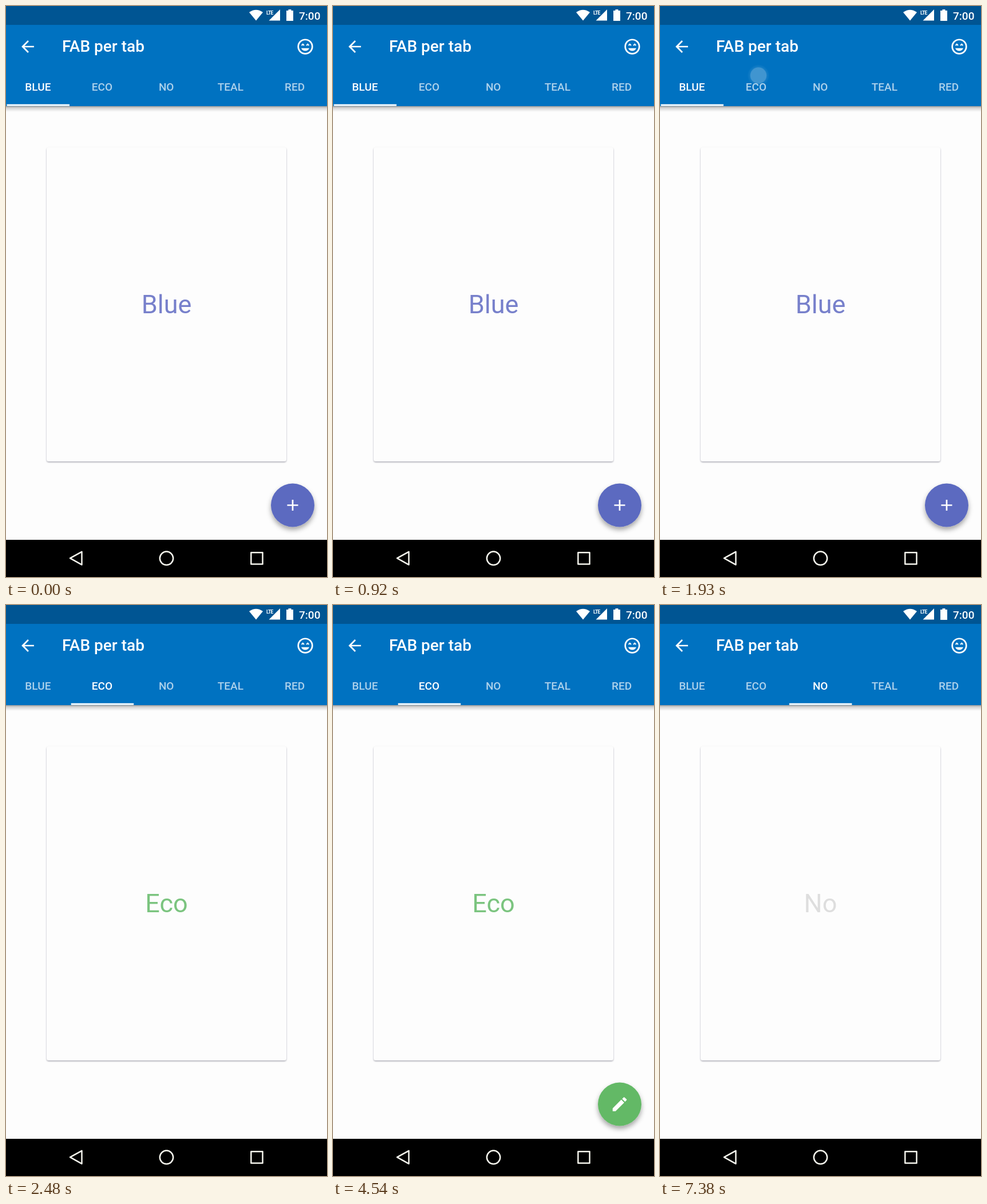
Recreate the animation shown at these times as an HTML page. Size 561 px wide and 998 px high, loop 8 s.

```html
<!DOCTYPE html>
<html lang="en">
<head>
<meta charset="utf-8">
<title>FAB per tab</title>
<style>
  html, body { margin: 0; width: 100%; height: 100%; overflow: hidden; background: #fdfdfd; }
  svg { display: block; width: 100%; height: 100%; font-family: Roboto, sans-serif; }
  .medium { font-weight: 500; fill: #fff; }
  .tab { font-size: 19px; text-anchor: middle; }
  .nav { fill: none; stroke: #f4f4ec; stroke-width: 2.5; stroke-linejoin: round; }
</style>
</head>
<body>
<svg viewBox="0 0 561 998">
  <defs>
    <linearGradient id="barShadow" x2="0" y2="1">
      <stop offset="0" stop-opacity=".4"/>
      <stop offset=".3" stop-opacity=".17"/>
      <stop offset="1" stop-opacity="0"/>
    </linearGradient>
    <radialGradient id="halo">
      <stop offset=".65" stop-color="#fff" stop-opacity=".3"/>
      <stop offset="1" stop-color="#fff" stop-opacity="0"/>
    </radialGradient>
    <filter id="cardShadow" x="-5%" y="-5%" width="110%" height="110%">
      <feDropShadow dx="0" dy="1.4" stdDeviation="1" flood-color="#33334d" flood-opacity=".45"/>
    </filter>
    <filter id="fabShadow" x="-30%" y="-30%" width="160%" height="170%">
      <feDropShadow dx="0" dy="5" stdDeviation="4" flood-opacity=".35"/>
    </filter>
  </defs>

  <rect width="561" height="998" fill="#fdfdfd"/>
  <rect x="71" y="247" width="419" height="549" rx="4" fill="#fdfdfd" filter="url(#cardShadow)"/>
  <text id="label" x="280.5" y="536.5" font-size="45" text-anchor="middle"></text>

  <g id="fab">
    <circle id="disc" cx="501" cy="872.5" r="38" filter="url(#fabShadow)"/>
    <path id="fabIcon" fill="#fff" transform="translate(484.65 856.15) scale(1.3625)"/>
  </g>

  <rect y="175" width="561" height="10" fill="url(#barShadow)"/>
  <rect width="561" height="175" fill="#0072c1"/>
  <rect width="561" height="33" fill="#005593"/>

  <g fill="#fff">
    <path d="M425 11Q437 2.5 449 11L437 25.5Z"/>
    <path d="M479 6V25.5H459.5Z"/>
    <path d="M493.5 6h5v2h3.5v18h-12v-18h3.5z"/>
    <text x="455" y="14.5" font-size="8.5" font-weight="700" letter-spacing="-.7">LTE</text>
    <path transform="translate(21.65 54.65) scale(1.3625)"
      d="M20 11H7.83l5.59-5.59L12 4l-8 8 8 8 1.41-1.41L7.83 13H20z"/>
    <g transform="translate(506.65 54.65) scale(1.3625)">
      <circle cx="12" cy="12" r="9" fill="none" stroke="#fff" stroke-width="2"/>
      <path d="M13 9.94L14.06 11l1.06-1.06L16.18 11l1.06-1.06-2.12-2.12zM8.88 9.94L9.94 11 11 9.94 8.88 7.82 6.76 9.94 7.82 11zM12 17.5c2.33 0 4.31-1.46 5.11-3.5H6.89c.8 2.04 2.78 3.5 5.11 3.5z"/>
    </g>
  </g>
  <text class="medium" x="512" y="23.7" font-size="19">7:00</text>
  <text class="medium" x="98" y="80" font-size="28">FAB per tab</text>
  <g id="tabs"></g>
  <rect id="indicator" y="171.7" width="109.5" height="3" fill="#fff"/>

  <g id="touch">
    <circle r="19.5" fill="url(#halo)"/>
    <circle r="14.2" fill="#fff" opacity=".48"/>
  </g>

  <rect y="933" width="561" height="65"/>
  <path class="nav" d="M112 965.2L132.5 953.8V976.6Z"/>
  <circle class="nav" cx="280.5" cy="965.3" r="11.7"/>
  <rect class="nav" x="428.3" y="955.3" width="20.2" height="20.2"/>
</svg>
<script>
const LOOP = 8000;
const TOUCH_TIME = 680;
const $ = id => document.getElementById(id);
const clamp = v => Math.max(0, Math.min(1, v));

const PLUS = "M19 13h-6v6h-2v-6H5v-2h6V5h2v6h6z";
const PENCIL = "M3 17.25V21h3.75L17.81 9.94l-3.75-3.75zM20.71 7.04a1 1 0 0 0 0-1.41l-2.34-2.34a1 1 0 0 0-1.41 0l-1.83 1.83 3.75 3.75z";

const pages = [
  { start: 0, text: "Blue", color: "#7780cb", fabStart: 0, fab: "#5c6bc0", icon: PLUS },
  { start: 2480, text: "Eco", color: "#7bc47f", fabStart: 3690, fab: "#63b966", icon: PENCIL },
  { start: 6570, text: "No", color: "#dedede" }
];
const touches = [
  { start: 1460, x: 172, y: 121.5 },
  { start: 3690, x: 271, y: 139 },
  { start: 6700, x: 396.5, y: 138.5 }
];

const tabs = ["BLUE", "ECO", "NO", "TEAL", "RED"].map((name, i) => {
  const tab = document.createElementNS("http://www.w3.org/2000/svg", "text");
  tab.setAttribute("class", "medium tab");
  tab.setAttribute("x", 55.8 + 112.2 * i);
  tab.setAttribute("y", 148);
  tab.textContent = name;
  return $("tabs").appendChild(tab);
});

function drawPage(t) {
  const index = pages.findLastIndex(p => t >= p.start);
  const page = pages[index];
  $("label").textContent = page.text;
  $("label").setAttribute("fill", page.color);
  $("indicator").setAttribute("x", 1.5 + 112.2 * index);
  tabs.forEach((tab, i) => tab.setAttribute("fill-opacity", i === index ? 1 : 0.68));

  const hasFab = page.fab && t >= page.fabStart;
  $("fab").setAttribute("visibility", hasFab ? "visible" : "hidden");
  if (hasFab) {
    $("disc").setAttribute("fill", page.fab);
    $("fabIcon").setAttribute("d", page.icon);
  }
}

function drawTouch(t) {
  const touch = touches.find(p => t >= p.start && t < p.start + TOUCH_TIME);
  $("touch").setAttribute("visibility", touch ? "visible" : "hidden");
  if (!touch) return;
  // The dot swells a little, then fades as the finger lifts.
  const age = t - touch.start;
  const swell = 1 + 0.08 * Math.sin(Math.PI * clamp(age / 470));
  $("touch").setAttribute("transform", `translate(${touch.x} ${touch.y}) scale(${swell})`);
  $("touch").setAttribute("opacity", 1 - 0.6 * clamp((age - 250) / 220));
}

function frame() {
  const t = performance.now() % LOOP;
  drawPage(t);
  drawTouch(t);
  requestAnimationFrame(frame);
}
frame();
</script>
</body>
</html>
```
